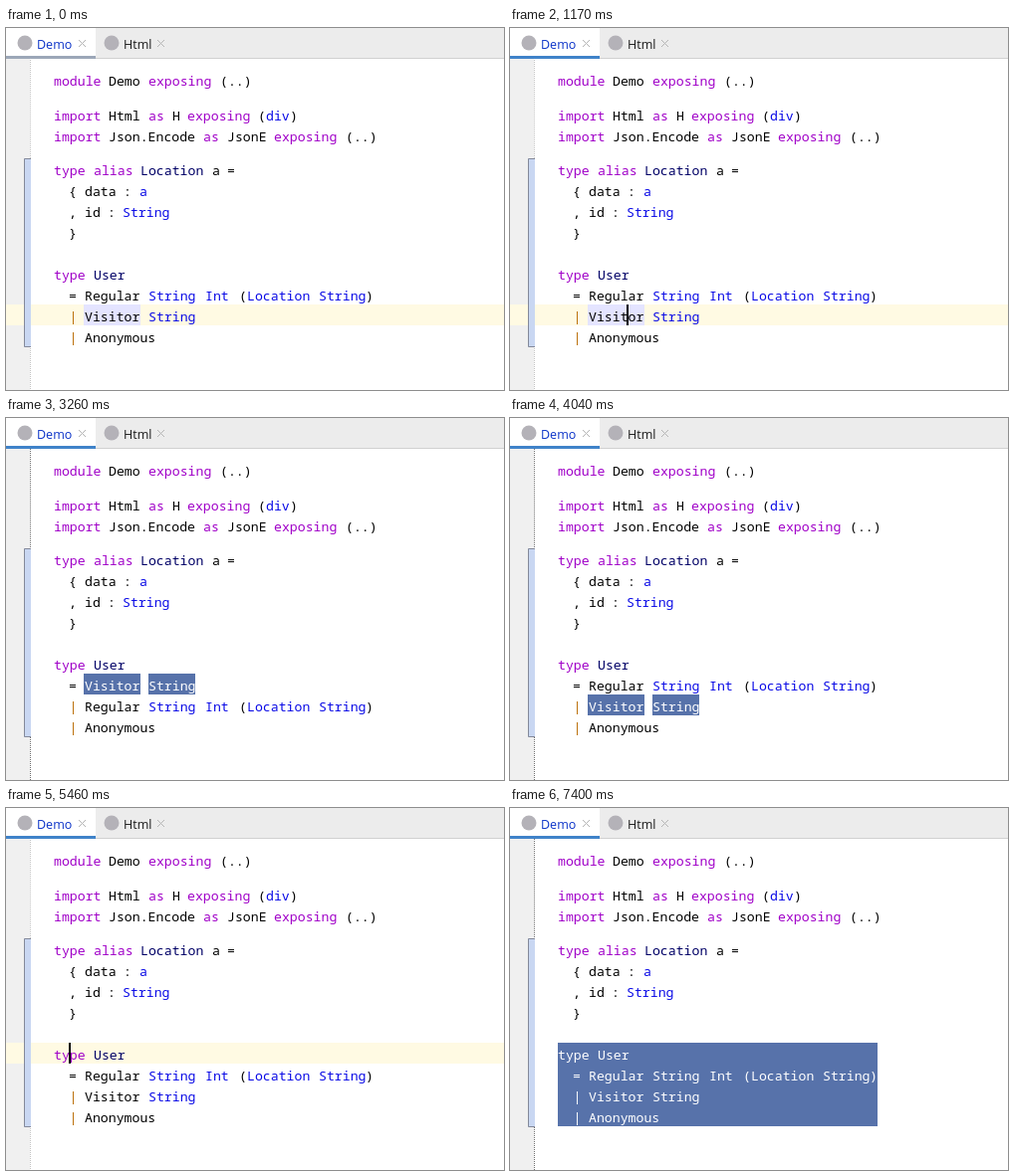
Animation of 500 by 364 pixels, one loop 8000 ms. Source, as an HTML page:

```html
<!DOCTYPE html>
<html lang="en">
<head>
<meta charset="utf-8">
<title>Moving declarations</title>
<style>
  html, body { margin: 0; width: 100%; height: 100%; overflow: hidden; background: #fff; }
  svg { display: block; width: 500px; height: 364px; }
  .code { font: 13.2px "Noto Sans Mono", "DejaVu Sans Mono", monospace; }
  .tab { font: 12.5px "Open Sans", "Noto Sans", sans-serif; }
</style>
</head>
<body>
<svg viewBox="0 0 500 364">
  <rect width="500" height="364" fill="#fff"/>
  <rect y="31" width="24" height="333" fill="#f0f0f0"/>
  <g id="back"></g>
  <path id="fold" d="M24.5 31V364" stroke-dasharray="1 1"/>
  <rect x="18" y="131" width="7" height="190" fill="#c9d7f2"/>
  <path d="M25 131.5H18.5V320.5H25" fill="none" stroke="#84899a"/>

  <rect width="500" height="31" fill="#ececec"/>
  <path d="M0 30.5H500" stroke="#d0d0d0"/>
  <rect width="90" height="31" fill="#fff"/>
  <rect id="underline" y="28" width="90" height="3"/>
  <g fill="#b4b2b8"><circle cx="19" cy="15" r="7.5"/><circle cx="106" cy="15" r="7.5"/></g>
  <text class="tab" x="31" y="21" fill="#0a32c8">Demo</text>
  <text class="tab" x="118" y="21" fill="#1a1a1a">Html</text>
  <path d="M73 12l7 7m0-7l-7 7M152 12l7 7m0-7l-7 7" stroke="#b4b4b4"/>

  <g id="code" class="code"></g>
  <rect id="caret" width="2" height="21" fill="#000"/>
  <path id="pointer" d="M0 0V27L6.5 21L10.5 30L14.5 28L10.5 19.5H19Z" fill="#fff" stroke="#000" stroke-width="1.2"/>
</svg>
<script>
const LOOP = 8000, ROW = 21, TOP = 131, BOTTOM = 236;
const el = id => document.getElementById(id);
const COLORS = { k: '#a000c8', t: '#0a0ae6', d: '#000066', b: '#000', o: '#b86a00' };

// Each word is "x:colour:text".
const HEADER = [
  [41, '48:k:module 103:b:Demo 143:k:exposing 215:b:(..)'],
  [76, '48:k:import 103:b:Html 143:k:as 167:b:H 182:k:exposing 253:b:( 261:t:div 285:b:)'],
  [97, '48:k:import 103:b:Json.Encode 198:k:as 222:b:JsonE 269:k:exposing 341:b:(..)']
];
const ALIAS = [
  '48:k:type 88:k:alias 135:d:Location 207:b:a 222:b:=',
  '63:b:{ 79:b:data 118:b:: 134:t:a',
  '63:b:, 79:b:id 102:b:: 117:t:String',
  '63:b:}'
];
const VARIANTS = {
  R: '79:b:Regular 143:t:String 200:t:Int 234:b:( 242:t:Location 314:t:String 361:b:)',
  V: '79:b:Visitor 143:t:String',
  A: '79:b:Anonymous'
};

// from: start time; order: variant order; line: highlighted row top; pick: chosen variant; block: whole type chosen
const SCENES = [
  { from: 0, order: 'RVA', line: 278, usage: true },
  { from: 1010, order: 'RVA', line: 278, usage: true, caret: 117, focus: true },
  { from: 1490, order: 'RVA', line: 278, usage: true, focus: true },
  { from: 1950, order: 'RVA', line: 278, usage: true, caret: 117, focus: true },
  { from: 2180, order: 'RAV', pick: 'V', focus: true },
  { from: 2880, order: 'RVA', pick: 'V', focus: true },
  { from: 3260, order: 'VRA', pick: 'V', focus: true },
  { from: 4040, order: 'RVA', pick: 'V', focus: true },
  { from: 5310, order: 'RVA', line: 257, caret: 63, focus: true },
  { from: 5460, order: 'RVA', line: 236, caret: 63, focus: true },
  { from: 6160, order: 'RVA', block: true, first: true, focus: true },
  { from: 7400, order: 'RVA', block: true, focus: true }
];

const rect = (x, y, w, h, fill) =>
  `<rect x="${x}" y="${y}" width="${w}" height="${h}" fill="${fill}"/>`;

const line = (top, words, color) => words.split(' ').map(word => {
  const [, x, kind, text] = word.match(/^([\d.]+):(\w):(.*)$/);
  return `<text x="${x}" y="${top + 17}" fill="${color || COLORS[kind]}">${text}</text>`;
}).join('');

function drawScene(s) {
  const userTop = s.first ? TOP : BOTTOM, aliasTop = s.first ? BOTTOM : TOP;
  const SELECTION = '#5772aa', white = s.block && '#fff';
  let back = s.line ? rect(0, s.line, 500, ROW, '#fffae3') : '';
  if (s.usage) back += rect(78, 278, 57, ROW, '#e4e4ff');
  if (s.block) back += rect(48, userTop, 321, 4 * ROW, SELECTION);

  let code = HEADER.map(([top, words]) => line(top, words)).join('');
  code += ALIAS.map((words, i) => line(aliasTop + i * ROW, words)).join('');
  code += line(userTop, '48:k:type 88:d:User', white);
  [...s.order].forEach((name, i) => {
    const top = userTop + (i + 1) * ROW, picked = s.pick === name;
    if (picked) back += rect(78, top, 57, ROW, SELECTION) + rect(143, top, 47, ROW, SELECTION);
    code += line(top, i ? '63.6:o:|' : '63:b:=', white);
    code += line(top, VARIANTS[name], picked ? '#fff' : white);
  });

  el('back').innerHTML = back;
  el('code').innerHTML = code;
  el('fold').setAttribute('stroke', s.line ? '#c4c4c4' : '#707070');
  el('fold').setAttribute('stroke-dashoffset', s.line ? 1 : 0);
  el('underline').setAttribute('fill', s.focus ? '#4083c9' : '#9ca7b8');
  el('caret').setAttribute('visibility', s.caret ? 'visible' : 'hidden');
  el('caret').setAttribute('x', s.caret || 0);
  el('caret').setAttribute('y', s.line || 0);
}

function drawPointer(t) {
  const shown = t >= 150 && t < 1170;
  el('pointer').setAttribute('visibility', shown ? 'visible' : 'hidden');
  const step = Math.min(7, Math.floor((t - 150) / 76.6) + 1) / 7;
  const left = (1 - step) ** 2;
  el('pointer').setAttribute('transform', `translate(${123.6 + 18 * left} ${291.8 + 80 * left})`);
}

let current;
function frame() {
  const t = performance.now() % LOOP;
  const scene = SCENES.findLast(s => s.from <= t);
  if (scene !== current) drawScene(current = scene);
  drawPointer(t);
  requestAnimationFrame(frame);
}
frame();
</script>
</body>
</html>
```
